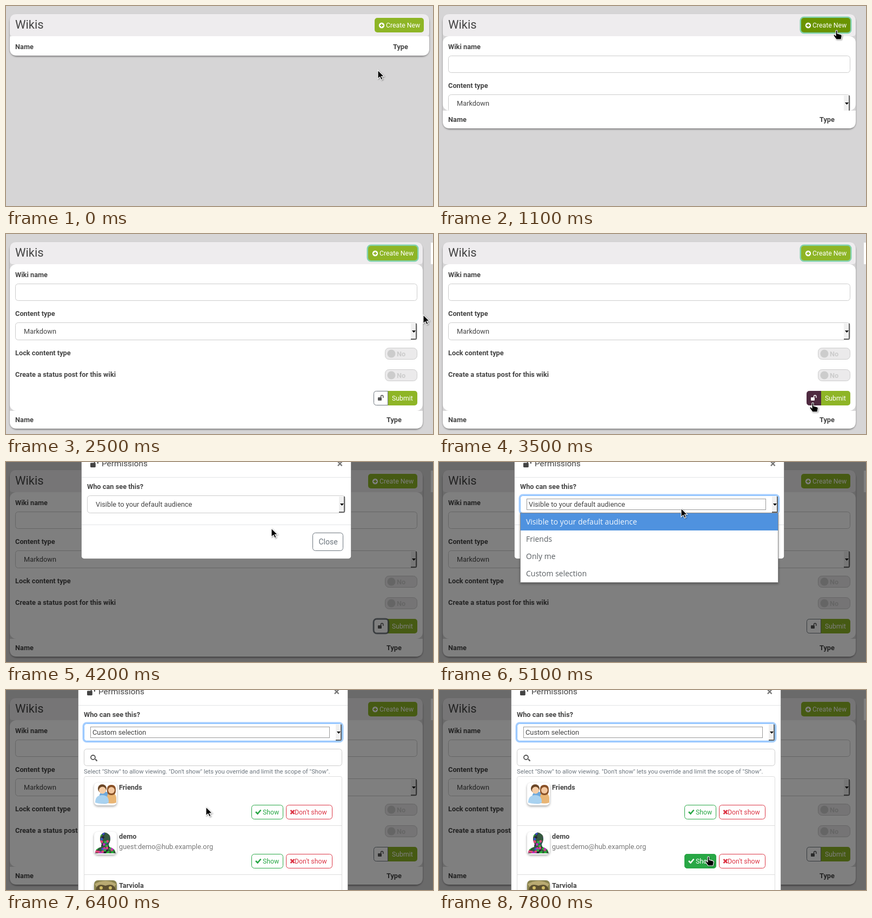
Write an HTML page that moves like this. It is 790 px wide and 371 px high and loops after 8 s.

```html
<!DOCTYPE html>
<html lang="en">
<head>
<meta charset="utf-8">
<title>Wikis</title>
<style>
  html, body { margin: 0; height: 100%; overflow: hidden; background: #d6d5d6; }
  svg { display: block; width: 790px; height: 371px; }
  text { font: 12.8px Roboto, sans-serif; fill: #444; white-space: pre; }
  .bold { font-weight: 700; }
  .title { font-size: 22px; }
  .button { font-size: 12.25px; fill: #fff; }
  .off { font-weight: 700; fill: #ccc; }
  .heading { font-size: 15.36px; }
  .close { font-size: 14px; fill: #6c757d; }
  .cross { font-size: 20px; font-weight: 700; fill: #777; }
  .option { font: 14px "Open Sans", sans-serif; fill: #5a5f63; }
  .picked { fill: #f4f8fd; }
  .help { font-size: 11.25px; fill: #6c757d; }
  .muted { fill: #777; }
  .card { filter: drop-shadow(0 2px 1.5px rgba(0, 0, 0, .4)); }
  .avatar { filter: drop-shadow(0 2px 2px rgba(0, 0, 0, .35)); }
</style>
</head>
<body>
<svg id="stage" viewBox="0 0 790 371"></svg>
<script>
const LOOP = 8000, STEP = 100;
const GREEN = '#8eb526', GREEN_DARK = '#6a9400', SHOW = '#28a745', HIDE = '#dc3545';

// Cursor path: time, x, y of the tip
const PATH = [
  [0, 688, 119], [500, 688, 119], [900, 735, 45], [2100, 735, 45],
  [2500, 772, 150], [3000, 742, 301], [3100, 691, 313], [3800, 691, 313],
  [3900, 593, 218], [4000, 593, 218], [4200, 491, 123], [4300, 491, 123],
  [4700, 448, 86], [5300, 448, 86], [5900, 370, 217], [6800, 370, 217],
  [6900, 421, 249], [7000, 421, 249], [7100, 498, 309], [LOOP, 498, 309]
];

const clamp = v => Math.max(0, Math.min(1, v));
const random = n => { const v = Math.sin(n * 12.9898) * 43758.5453; return v - Math.floor(v); };

const box = (x, y, w, h, r, fill, stroke = 'none', extra = '') =>
  `<rect x="${x}" y="${y}" width="${w}" height="${h}" rx="${r}" fill="${fill}" stroke="${stroke}" ${extra}/>`;
const frame = (x, y, w, h, stroke = '#ccc', fill = '#fff') =>
  box(x + .5, y + .5, w - 1, h - 1, 5, fill, stroke);
const ring = (x, y, w, h, color) =>
  box(x - 1, y - 1, w + 2, h + 2, 6, 'none', color, 'stroke-width="3"');
const text = (x, y, str, cls = '') => `<text x="${x}" y="${y}" class="${cls}">${str}</text>`;
const path = (d, fill, stroke = 'none', width = 1) =>
  `<path d="${d}" fill="${fill}" stroke="${stroke}" stroke-width="${width}"/>`;
const circle = (x, y, r, fill) => `<circle cx="${x}" cy="${y}" r="${r}" fill="${fill}"/>`;
const line = (x, y, w, color = '#e3e5e7') => path(`M${x} ${y + .5}h${w}`, 'none', color);
const group = (content, attrs) => `<g ${attrs}>${content}</g>`;

function cursorAt(t) {
  const i = PATH.findIndex(key => key[0] > t);
  const [t0, x0, y0] = PATH[i - 1], [t1, x1, y1] = PATH[i];
  const k = (t - t0) / (t1 - t0);
  return [Math.round(x0 + (x1 - x0) * k), Math.round(y0 + (y1 - y0) * k)];
}

function cursor(x, y, hand) {
  const shape = hand
    ? 'M-1 1Q1-1 2 1V6L9 8Q11 9 10 12L9 17H0L-5 10Q-5 7-3 8L-1 10Z'
    : 'M0 0V16L3.8 12.6L6.4 18L9 16.8L6.5 11.5H11.5Z';
  return group(path(shape, '#000', '#fff', 1.1),
    `transform="translate(${x} ${y})" style="filter:drop-shadow(1px 1px 1px rgba(0,0,0,.4))"`);
}

const unlock = (x, y, color, scale = 1) => group(
  box(0, 4, 7, 6, 1, color) + path('M5.5 5V2.5a2.2 2.2 0 0 1 4.4 0V5', 'none', color, 1.4),
  `transform="translate(${x} ${y}) scale(${scale})"`);

function select(x, y, w, label, focused) {
  const right = x + w;
  return (focused ? ring(x, y, w, 33, 'rgba(90,165,255,.55)') : '') +
    frame(x, y, w, 33, focused ? '#80bdff' : '#ccc') +
    box(right - 12, y + 2, 10, 29, 0, '#f0f0f0') +
    path(`M${right - 12} ${y + 31}h9q1 0 1-1v-28`, 'none', '#666', 2) +
    path(`M${right - 10} ${y + 15}h7l-3.5 4z`, '#000') +
    (focused ? box(x + 12.5, y + 6.5, 442, 20, 0, 'none', '#333', 'stroke-dasharray="1 1"') : '') +
    text(x + 16, y + 21, label);
}

const toggle = y => box(701.5, y + .5, 59, 21, 7, '#ebeaeb', '#ccc') +
  circle(713, y + 11, 7.5, '#ccc') + text(723, y + 15.5, 'No', 'off');

function createButton(x, hover, focused) {
  const fill = hover ? GREEN_DARK : GREEN;
  return (focused ? ring(x, 22, 91, 27, 'rgba(40,190,120,.55)') : '') +
    box(x, 22, 91, 27, 5, fill) + circle(x + 13, 36, 5.2, '#fff') +
    path(`M${x + 10} 36h6m-3-3v6`, 'none', fill, 1.8) + text(x + 21, 40, 'Create New', 'button');
}

function form(s) {
  const lockFill = s.lockHover ? '#4f2a40' : '#fff';
  return text(17, 80, 'Wiki name', 'bold') + frame(17, 92, 744, 32) +
    text(17, 152, 'Content type', 'bold') + select(17, 164, 744, 'Markdown') +
    text(17, 225, 'Lock content type', 'bold') + toggle(211) +
    text(17, 265, 'Create a status post for this wiki', 'bold') + toggle(251) +
    box(690, 291, 71, 27, 5, s.submitHover ? GREEN_DARK : GREEN) +
    path('M706.5 291.5H685.5q-5 0-5 5v16q0 5 5 5H706.5Z', lockFill, s.lockHover ? lockFill : '#6c757d') +
    unlock(688, 299, s.lockHover ? '#fff' : '#555') +
    (s.lockFocus ? ring(681, 292, 26, 25, 'rgba(80,88,95,.65)') : '') +
    text(714, 309, 'Submit', 'button');
}

function page(s) {
  const right = s.open ? 771 : 783, width = right - 7, drop = Math.round(269 * s.open);
  const bottom = 59 + drop, corner = drop ? 12 : 3;
  return box(7, 15, width, 77 + drop, 13, '#d6d5d6', 'none', 'class="card"') +
    path(`M7 28q0-13 13-13H${right - 13}q13 0 13 13V50q0 6-6 6H13q-6 0-6-6Z`, '#eeecee') +
    text(17, 42, 'Wikis', 'title') + createButton(right - 101, s.createHover, s.createFocus) +
    box(7, 56, width, 3 + drop, corner, '#fff') +
    (s.open ? group(form(s), 'clip-path="url(#formClip)"') +
      `<clipPath id="formClip">${box(0, 56, 790, drop + 3, 0, '#000')}</clipPath>` : '') +
    path(`M7 ${bottom}H${right}v20q0 13-13 13H20q-13 0-13-13Z`, '#fff') +
    text(17, bottom + 21, 'Name', 'bold') + text(right - 67, bottom + 21, 'Type', 'bold') +
    (s.open === 1 ? box(786, 16, 4, 40, 0, '#fff') : '');
}

function dropdown(cursorY) {
  const active = Math.max(0, Math.min(3, Math.floor((cursorY - 95) / 32)));
  return box(150.5, 94.5, 477, 129, 0, '#fff', '#8a8a8a', 'class="avatar"') +
    box(151, 95 + active * 32, 476, 32, 0, '#4f92df') +
    ['Visible to your default audience', 'Friends', 'Only me', 'Custom selection']
      .map((label, i) => text(161, 116 + i * 32, label, i === active ? 'option picked' : 'option')).join('');
}

const friendsAvatar =
  path('M172 202q0-14 10-14 9 0 9 14v7q-10 4-19 0Z', '#6ea9dc') +
  path('M187 209v-9q0-10 8-10t9 10v9q-9 3-17 0Z', '#e9b574') +
  box(187, 176, 16, 19, 7, '#8a5127') + circle(195, 186, 6, '#f3c8a0') +
  circle(178, 183, 8, '#6a4526') + circle(178.5, 186, 6.5, '#f5cda6') +
  path('M165 209q0-14 13-14t12 14q-12 4-25 0Z', '#a9d2f0');

const silhouette = 'M165 303q0-9 11-12l1-5q-5-8-2-16 8-11 17 0 3 8-2 16l1 5q11 3 12 12Z';
const specks = Array.from({ length: 70 }, (_, i) => circle(
  (164 + random(i + 1) * 40).toFixed(1), (263 + random(i + 91) * 41).toFixed(1), 2.4,
  ['#2fb53c', '#c02fc0', '#223', '#3a55c8', '#e04a7a'][i % 5])).join('');
const speckledAvatar = `<clipPath id="bust">${path(silhouette, '#000')}</clipPath>` +
  path(silhouette, '#35593f') + group(specks, 'clip-path="url(#bust)"');

const photoAvatar = box(163, 353, 42, 42, 7, '#8b8550') +
  path('M164 360q20-12 40 0l-8 11h-24Z', '#b9aa72') +
  path('M166 371q2-14 18-8 16-6 19 8Z', '#5d5030') +
  circle(176, 367, 3, '#d2bd66') + circle(193, 367, 3, '#d2bd66');

function contact(i, name, address, avatar, pressed) {
  const y = 160 + i * 91;
  return box(163, y + 12, 42, 42, 7, '#fff', 'none', 'class="avatar"') + avatar +
    text(209, y + 25, name, 'bold') + text(209, y + 44, address, 'muted') +
    frame(454, y + 53, 59, 27, SHOW) +
    box(454, y + 53, 59, 27, 5, SHOW, 'none', `opacity="${pressed}"`) +
    path(`M462 ${y + 66}l3.5 3.5 6-7`, 'none', pressed > .5 ? '#fff' : SHOW, 2.6) +
    `<text x="475" y="${y + 71}" class="button" style="fill:${pressed > .5 ? '#fff' : SHOW}">Show</text>` +
    frame(518, y + 53, 86, 27, HIDE) +
    path(`M526.5 ${y + 63}l7 7m0-7l-7 7`, 'none', HIDE, 2.6) +
    `<text x="534" y="${y + 71}" class="button" style="fill:${HIDE}">Don't show</text>` +
    line(144, y + 91, 478, '#ddd');
}

// Shown in final coordinates, after the dialog has moved left
const contacts = s => frame(144, 109, 478, 32) +
  path('M165.2 128.2l3.3 3.6', 'none', '#555', 2.2) +
  '<circle cx="161" cy="125" r="4" fill="none" stroke="#555" stroke-width="1.8"/>' +
  text(144, 155, 'Select "Show" to allow viewing. "Don\'t show" lets you override and limit the scope of "Show".', 'help') +
  box(144.5, 160.5, 477, 300, 3, '#fff', '#ddd') +
  contact(0, 'Friends', '', friendsAvatar, 0) +
  contact(1, 'demo', 'guest:demo@hub.example.org', speckledAvatar, s.pressed) +
  contact(2, 'Tarviola', '', photoAvatar, 0);

function modal(s) {
  const shift = s.custom ? -6 : 0;
  const head = box(139.5, -30.5, 499, s.custom ? 500 : 210, 5, '#fff', 'rgba(0,0,0,.25)') +
    unlock(156, -4, '#444', 1.4) + text(177, 8, 'Permissions', 'heading') +
    text(612.5, 9.5, '×', 'cross') + line(140, 28, 498) +
    text(150, 50, 'Who can see this?', 'bold') +
    select(150, 62, 478, s.custom ? 'Custom selection' : 'Visible to your default audience', s.selectFocus);
  const foot = line(140, 116, 498) + frame(567, 131, 57, 34, '#6c757d') + text(578.5, 153, 'Close', 'close');
  return box(0, 0, 790, 371, 0, '#000', 'none', `opacity="${s.modal * .5}"`) +
    group(group(head + (s.custom ? '' : foot), `transform="translate(${shift} ${(s.modal - 1) * 50})"`) +
      (s.custom ? contacts(s) : ''), `opacity="${s.modal}"`) +
    (s.dropdown ? dropdown(s.y) : '');
}

function scene(t) {
  const [x, y] = cursorAt(t);
  const during = (from, to) => t >= from && t < to;
  const s = {
    y,
    open: clamp((t - 1000) / 200),
    createHover: during(800, 2300),
    createFocus: during(1100, 3600),
    submitHover: during(3000, 3100),
    lockHover: during(3100, 3600),
    lockFocus: during(3600, 4800),
    modal: clamp((t - 3500) / 200),
    selectFocus: t >= 4800,
    dropdown: during(4800, 6400),
    custom: t >= 6400,
    pressed: clamp((t - 7500) / 300)
  };
  const hand = s.createHover || during(3000, 3600) || t >= 7100;
  return page(s) + (s.modal ? modal(s) : '') + cursor(x, y, hand);
}

const stage = document.getElementById('stage');
let shown = -1;
function tick() {
  const t = Math.floor(performance.now() % LOOP / STEP) * STEP;
  if (t !== shown) stage.innerHTML = scene(shown = t);
  requestAnimationFrame(tick);
}
tick();
</script>
</body>
</html>
```
